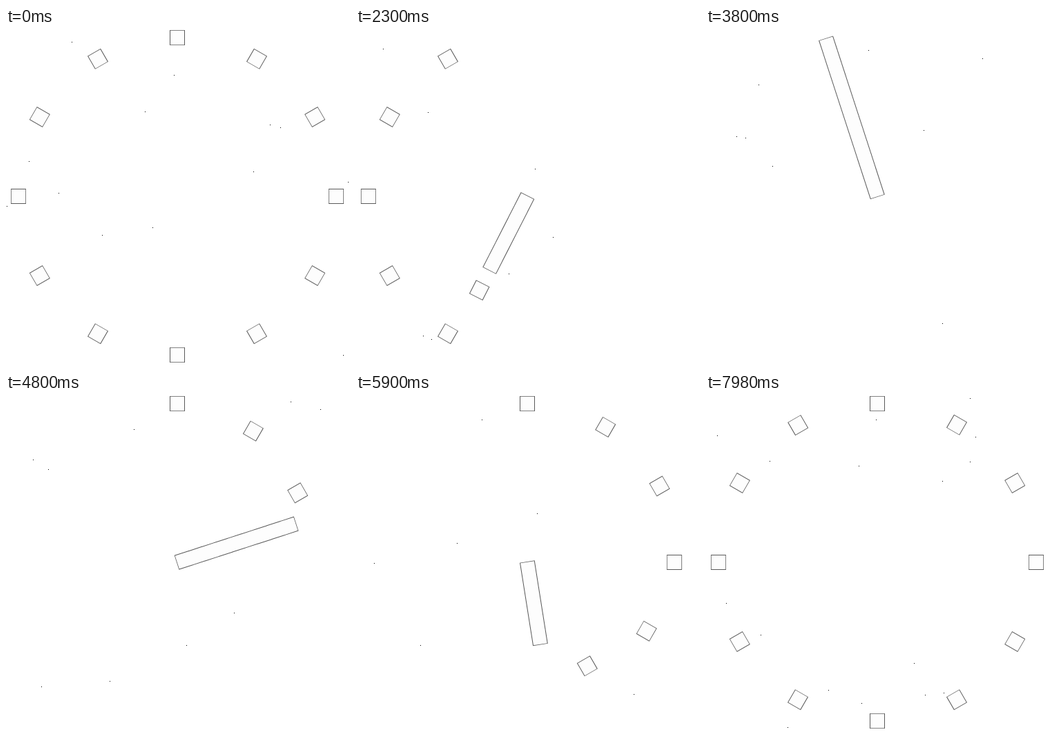
Animation of 498 by 490 pixels, one loop 8000 ms. Source, as an HTML page with a canvas:

```html
<!DOCTYPE html>
<html>
<head>
<meta charset="utf-8">
<style>
  html, body { margin: 0; width: 498px; height: 490px; overflow: hidden; background: #fff; }
  canvas { display: block; }
</style>
</head>
<body>
<canvas width="498" height="490"></canvas>
<script>
const W = 498, H = 490, CX = 248, CY = 244;
const TURN = 4000, COUNT = 12, STEP = TURN / COUNT;
const RADIUS = 230, SIZE = 20, DROP = 500, FRAME = 20;
const LINE = '#5a5a5a', FILL = '#fdfdfd';
const ctx = document.querySelector('canvas').getContext('2d');

function bounceOut(u) {
  const n = 7.5625, d = 2.75;
  if (u < 1 / d) return n * u * u;
  if (u < 2 / d) return n * (u - 1.5 / d) ** 2 + 0.75;
  if (u < 2.5 / d) return n * (u - 2.25 / d) ** 2 + 0.9375;
  return n * (u - 2.625 / d) ** 2 + 0.984375;
}

const circOut = u => Math.sqrt(1 - (1 - u) ** 2);
const mix = (a, b, u) => a + (b - a) * u;

function seeded(seed) {
  return () => {
    seed = (seed + 0x6d2b79f5) | 0;
    let x = Math.imul(seed ^ (seed >>> 15), 1 | seed);
    x ^= x + Math.imul(x ^ (x >>> 7), 61 | x);
    return ((x ^ (x >>> 14)) >>> 0) / 4294967296;
  };
}

// First turn: the hand collects the blocks. Second turn: it puts them back.
function block(k, t) {
  const home = k * 2 * Math.PI / COUNT;
  const time = t % TURN;
  const hand = time / TURN * 2 * Math.PI;
  const age = time - k * STEP;
  if (t < TURN) {
    if (age < 0) return [home, RADIUS];
    return [hand, mix(RADIUS, SIZE * (k + 0.5), bounceOut(Math.min(1, age / DROP)))];
  }
  const from = RADIUS - SIZE * k;
  if (age < 0) return [hand, from];
  return [home, mix(from, RADIUS, circOut(age / (TURN - k * STEP)))];
}

function fillBlocks(blocks, width, length, color) {
  ctx.beginPath();
  for (const [angle, r] of blocks) {
    ctx.setTransform(1, 0, 0, 1, CX, CY);
    ctx.rotate(angle);
    ctx.rect(-width / 2, -r - length / 2, width, length);
  }
  ctx.resetTransform();
  ctx.fillStyle = color;
  ctx.fill();
}

function drawSpecks(frame) {
  const rand = seeded(frame * 7919 + 1);
  const n = 6 + Math.floor(rand() * 12);
  ctx.fillStyle = '#000';
  for (let i = 0; i < n; i++) {
    ctx.fillRect(Math.floor(rand() * W), Math.floor(rand() * H), 1, 1);
  }
}

const start = performance.now();

function draw() {
  const frame = Math.floor((performance.now() - start) % (2 * TURN) / FRAME);
  const t = frame * FRAME;
  const blocks = Array.from({ length: COUNT }, (_, k) => block(k, t));
  ctx.fillStyle = '#fff';
  ctx.fillRect(0, 0, W, H);
  drawSpecks(frame);
  // The border is a larger dark shape, so touching blocks merge;
  // the inner shapes overlap a little to leave no seam.
  fillBlocks(blocks, SIZE + 2, SIZE + 2, LINE);
  fillBlocks(blocks, SIZE, SIZE + 0.5, FILL);
  requestAnimationFrame(draw);
}
draw();
</script>
</body>
</html>
```
